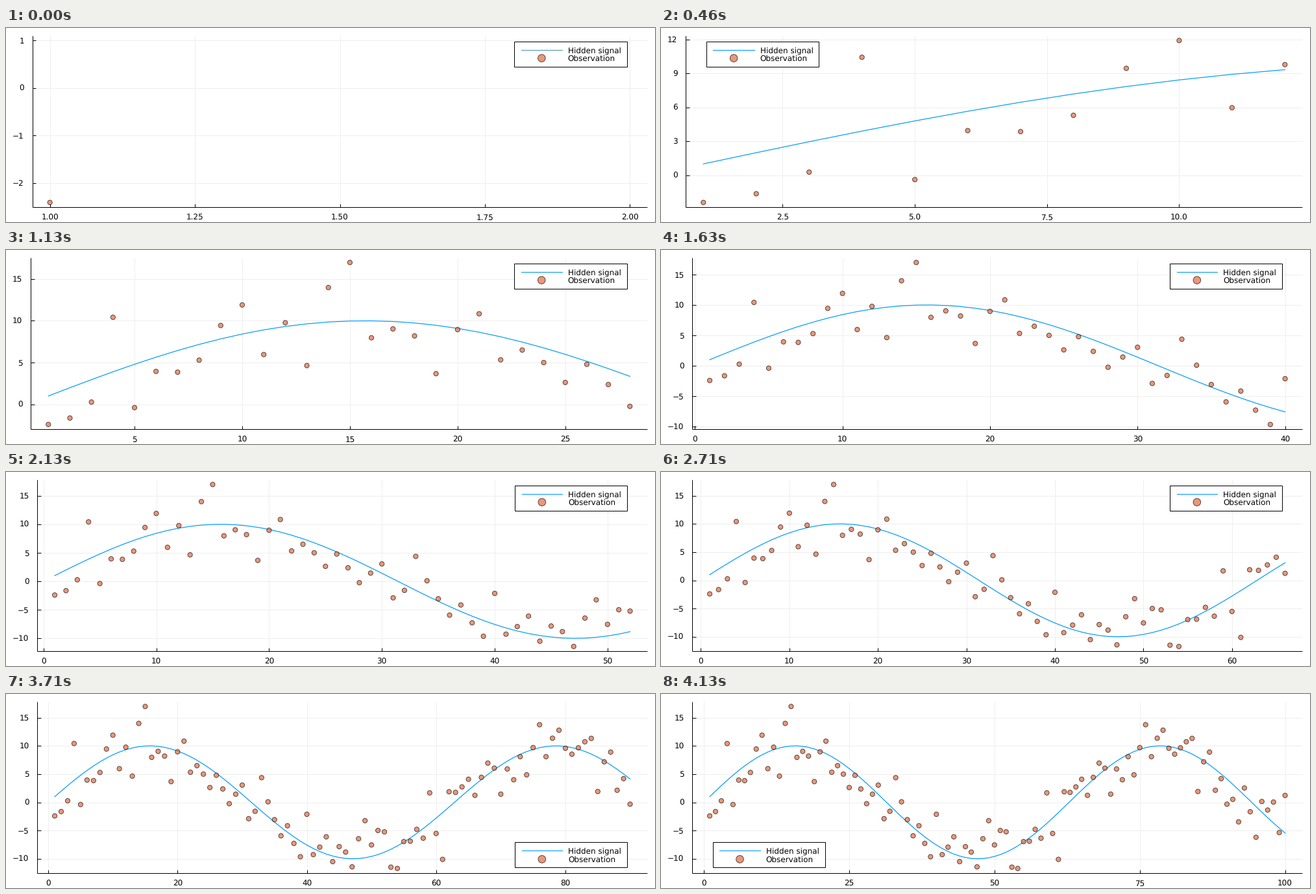
Write a matplotlib script that moves like this. It is 1000x300 px and loops after 4.18 s.

```python
import math

import matplotlib.pyplot as plt
import numpy as np
from matplotlib.animation import FuncAnimation
from matplotlib.collections import EllipseCollection, LineCollection
from matplotlib.patches import Rectangle

WIDTH, HEIGHT, DPI = 1000, 300, 100
TOP, BOTTOM, RIGHT = 11.8, 277.3, 988.2
EM = 12                      # font size in pixels
PT = 72 / DPI                # points per pixel
BLUE, MUTED = "#009afa", "#4f98a9"
FILL, EDGE = (0.886, 0.435, 0.275, 0.72), (0, 0, 0, 0.7)
GLYPH = {".": 0.318, "−": 0.838}

OBS = np.array([
    -2.41, -1.64, 0.27, 10.42, -0.39, 3.94, 3.85, 5.29, 9.44, 11.9,
    5.96, 9.77, 4.64, 13.98, 16.98, 7.97, 9.03, 8.19, 3.67, 8.95,
    10.84, 5.33, 6.5, 5.0, 2.62, 4.79, 2.37, -0.24, 1.44, 3.05,
    -2.9, -1.59, 4.37, 0.09, -3.07, -5.93, -4.15, -7.28, -9.64, -2.12,
    -9.27, -7.94, -6.11, -10.51, -7.85, -8.82, -11.43, -6.45, -3.25, -7.55,
    -4.99, -5.23, -11.49, -11.72, -6.96, -6.89, -4.79, -6.35, 1.68, -5.52,
    -10.11, 1.87, 1.76, 2.73, 4.09, 1.24, 4.42, 6.95, 6.06, 1.45,
    5.91, 4.0, 8.09, 4.87, 9.7, 13.75, 8.09, 11.36, 12.78, 9.58,
    8.53, 9.66, 10.73, 11.33, 1.92, 7.18, 8.9, 2.14, 4.2, -0.33,
    0.53, -3.46, 2.54, -1.67, -6.19, 0.14, -1.37, 0.04, -5.36, 1.22])
COUNT = len(OBS)
T = np.arange(1, COUNT + 1)
SIGNAL = 10 * np.sin(T / 10)


def widen(lo, hi):
    pad = 0.03 * (hi - lo)
    return lo - pad, hi + pad


def nice_ticks(lo, hi):
    """Score candidate steps by tick count, coverage, niceness and zero."""
    span = hi - lo
    best = None
    top = math.floor(math.log10(span))
    for z in (top, top - 1):
        for q, nice in ((1, 1), (5, 0.9), (2, 0.7), (2.5, 0.5), (3, 0.2)):
            step = q * 10.0 ** z
            first, last = math.ceil(lo / step), math.floor(hi / step)
            num = last - first + 1
            if not 4 <= num <= 8:
                continue
            end = math.ceil(hi / step)
            zero = lo <= 0 or (end * step < 2 * span and end < 16)
            score = (0.25 * (1 - abs(num - 5) / 5) + zero / 6
                     + 0.5 * span / ((num - 1) * step) + 0.25 * nice)
            key = (round(score, 9), z, math.floor(lo / step) - end)
            if best is None or key > best[0]:
                best = key, np.arange(first, last + 1) * step
    return best[1]


def tick_labels(ticks):
    digits = next(d for d in range(4) if np.allclose(np.round(ticks, d), ticks, atol=1e-9))
    return [f"{abs(t):.{digits}f}" if t > -1e-9 else f"−{-t:.{digits}f}" for t in ticks]


def text_width(text):
    return EM * sum(GLYPH.get(c, 0.636) for c in text)


def best_corner(u, v):
    """Emptiest corner for unit coordinates, as (right, top)."""
    def crowd(corner):
        du, dv = abs(u - corner[0]), abs(v - corner[1])
        near = (du <= 0.25) & (dv <= 0.25)
        return np.sum(1 / (1 + 100 * np.hypot(du, dv)[near]))
    return min(((1, 1), (0, 1), (1, 0), (0, 0)), key=crowd)


def build_scene(n):
    t, obs, sig = T[:n], OBS[:n], SIGNAL[:n]
    x0, x1 = widen(1, max(n, 2))
    y0, y1 = widen(min(obs.min(), sig.min()), max(obs.max(), sig.max()))
    xt, yt = nice_ticks(x0, x1), nice_ticks(y0, y1)
    xl, yl = tick_labels(xt), tick_labels(yt)
    left = 23.15 + max(map(text_width, yl))
    w, h = RIGHT - left, BOTTOM - TOP

    def px(x):
        return left + w * (x - x0) / (x1 - x0)

    def py(y):
        return BOTTOM - h * (y - y0) / (y1 - y0)

    grid = [[(x, TOP), (x, BOTTOM)] for x in px(xt)]
    grid += [[(left, y), (RIGHT, y)] for y in py(yt)]
    axes = [[(left, TOP), (left, BOTTOM)], [(left, BOTTOM), (RIGHT, BOTTOM)]]
    axes += [[(x, BOTTOM), (x, BOTTOM - 5.3)] for x in px(xt)]
    axes += [[(left, y), (left + 5.3, y)] for y in py(yt)]

    u = np.tile((t - x0) / (x1 - x0), 2)
    v = (np.concatenate([sig, obs]) - y0) / (y1 - y0)
    right, top = best_corner(u, v)
    box_w, box_h = w / 15 + 110.1, 39
    box_x = RIGHT - w / 30 - box_w if right else left + w / 30
    box_y = TOP + h / 30 if top else BOTTOM - h / 30 - box_h

    return dict(
        grid=grid, axes=axes,
        curve=(px(t), py(sig)), dots=np.column_stack([px(t), py(obs)]),
        xlabels=[(x, 296.4, s) for x, s in zip(px(xt), xl)],
        ylabels=[(left - 13, y + 4.4, s) for y, s in zip(py(yt), yl)],
        box=(box_x, box_y, box_w, box_h), key_w=w / 15,
        key_color=MUTED if n == 1 else BLUE)


SCENES = [build_scene(n) for n in range(1, COUNT + 1)]

plt.rcParams.update({"font.family": "DejaVu Sans", "font.size": EM * PT,
                     "text.hinting": "none"})
fig = plt.figure(figsize=(WIDTH / DPI, HEIGHT / DPI), dpi=DPI, facecolor="white")
ax = fig.add_axes([0, 0, 1, 1])
ax.set(xlim=(0, WIDTH), ylim=(HEIGHT, 0))
ax.axis("off")


def segments(color, z):
    lines = LineCollection([], colors=color, linewidths=PT, zorder=z)
    lines.set_snap(True)
    return ax.add_collection(lines, autolim=False)


def circles(size, num, z):
    dots = EllipseCollection(
        np.full(num, size), np.full(num, size), np.zeros(num), units="dots",
        offsets=np.zeros((1, 2)), offset_transform=ax.transData,
        facecolors=[FILL], edgecolors=[EDGE], linewidths=0.9 * PT, zorder=z)
    return ax.add_collection(dots, autolim=False)


def labels(num, align, z=3):
    return [ax.text(0, 0, "", ha=align, va="baseline", zorder=z) for _ in range(num)]


grid = segments("#eeeeee", 1)
axes = segments("black", 2)
curve, = ax.plot([], [], color=BLUE, lw=1.2 * PT, zorder=4)
dots = circles(7.2, COUNT, 5)
xlabels, ylabels = labels(8, "center"), labels(8, "right")

box = ax.add_patch(Rectangle((0, 0), 1, 1, fc="white", ec="black", lw=PT, zorder=6))
key_line, = ax.plot([], [], lw=1.1 * PT, zorder=7)
key_dot = circles(11.6, 2, 7)
key_text = labels(2, "left", 7)


def place(pool, items):
    for i, label in enumerate(pool):
        x, y, s = items[i] if i < len(items) else (0, 0, "")
        label.set_position((x, y))
        label.set_text(s)


def draw(tick):
    # each tick is 10 ms; points arrive at 24 per second
    s = SCENES[min((6 * tick + 2) // 25, COUNT - 1)]
    grid.set_segments(s["grid"])
    axes.set_segments(s["axes"])
    curve.set_data(*s["curve"])
    dots.set_offsets(s["dots"])
    place(xlabels, s["xlabels"])
    place(ylabels, s["ylabels"])

    x, y, w, h = s["box"]
    box.set_bounds(x, y, w, h)
    a, b = x + 10.4, x + 10.4 + s["key_w"]
    y1, y2 = y + h / 3, y + 2 * h / 3
    key_line.set_data([a, b], [y1, y1])
    key_line.set_color(s["key_color"])
    key_dot.set_offsets([((a + b) / 2, y2)])
    place(key_text, [(b + 8.9, y1 + 4.4, "Hidden signal"),
                     (b + 8.9, y2 + 4.4, "Observation")])


anim = FuncAnimation(fig, draw, frames=418, interval=10, init_func=lambda: draw(0),
                     repeat=True, repeat_delay=0, cache_frame_data=False)
plt.show()
```
